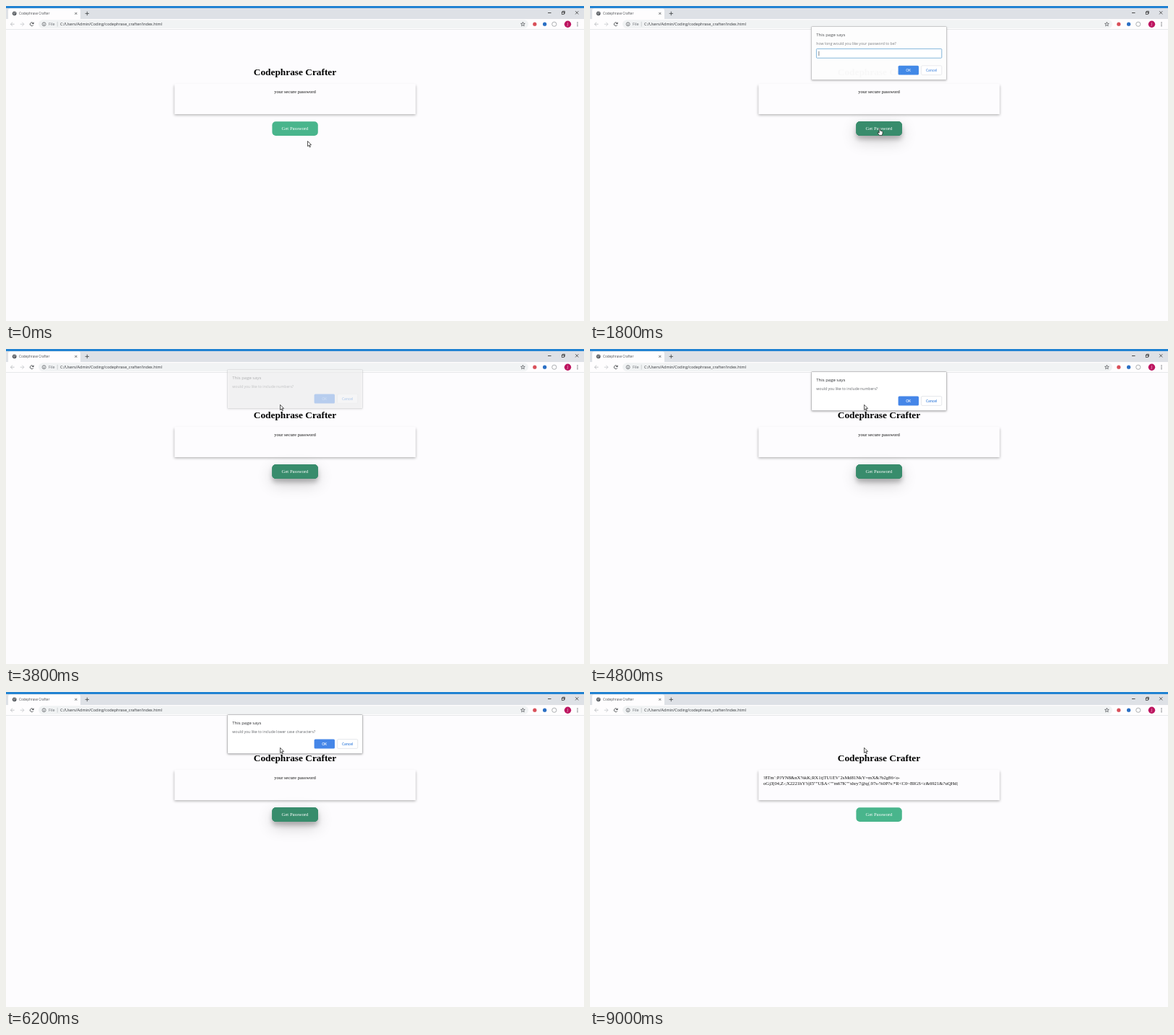
An HTML page with a canvas for the animation above (9.1 s loop, 800x437 px).

```html
<!DOCTYPE html>
<html lang="en">
<head>
<meta charset="utf-8">
<title>Codephrase Crafter</title>
<style>
html, body { margin: 0; width: 100%; height: 100%; overflow: hidden; background: #fdfcfe; }
canvas { display: block; width: 100vw; height: 100vh; }
</style>
</head>
<body>
<canvas id="stage" width="800" height="437"></canvas>
<script>
const ctx = document.getElementById('stage').getContext('2d');
const LOOP = 9100, STEP = 100;
const SANS = '"Open Sans", "Noto Sans", sans-serif';
const SERIF = '"Liberation Serif", "Noto Serif", serif';
const PAGE = '#fdfcfe', TITLE = 'Codephrase Crafter';

const PASSWORD = [
  '!8Tm`:PJYN8&nX%kK;RX1tjTU1EV`2sMd81NkY=mX&?b2g86<o-',
  'oGj3[04,Z-;X2221hY!t)I5""U$A<""m67K""xhry7@q(.97s-%0P?s:*R<C0~BIGS<c&6921&?uQHd|'
];

const DIALOGS = [
  { from: 1500, fade: 360, to: 3700, prompt: true, msg: 'how long would you like your password to be?' },
  { from: 3700, fade: 300, to: 5000, msg: 'would you like to include numbers?' },
  { from: 5000, fade: 300, to: 6000, msg: 'would you like to include upper case characters?' },
  { from: 6000, fade: 200, to: 7000, msg: 'would you like to include lower case characters?' },
  { from: 7000, fade: 200, to: 8100, msg: 'would you like to include special characters?' }
];

// time, x, y of the pointer tip
const POINTER = [
  [0, 417.5, 187.5], [200, 396.5, 200], [500, 396.5, 200], [900, 291, 198],
  [1300, 401, 170], [1800, 401, 170], [2300, 379.5, 77.3], [LOOP, 379.5, 77.3]
];

const clamp = v => Math.max(0, Math.min(1, v));
const mix = (a, b, k) => a + (b - a) * k;

function text(str, x, y, size, color, { align = 'left', family = SANS, weight = 400 } = {}) {
  ctx.font = `${weight} ${size}px ${family}`;
  ctx.textAlign = align;
  ctx.fillStyle = color;
  ctx.fillText(str, x, y);
}

function rect(x, y, w, h, color) {
  ctx.fillStyle = color;
  ctx.fillRect(x, y, w, h);
}

function box(x, y, w, h, r, fill, stroke, width = 0.8) {
  ctx.beginPath();
  ctx.roundRect(x, y, w, h, r);
  ctx.fillStyle = fill;
  ctx.fill();
  if (stroke) outline(stroke, width);
}

function outline(color, width) {
  ctx.strokeStyle = color;
  ctx.lineWidth = width;
  ctx.stroke();
}

function shadowBox(x, y, w, h, r, fill, dy, blur, alpha) {
  ctx.save();
  ctx.shadowColor = `rgba(0,0,0,${alpha})`;
  ctx.shadowBlur = blur;
  ctx.shadowOffsetY = dy;
  box(x, y, w, h, r, fill);
  ctx.restore();
}

function disc(x, y, r, color) {
  ctx.beginPath();
  ctx.arc(x, y, r, 0, 7);
  ctx.fillStyle = color;
  ctx.fill();
}

function ring(x, y, r, color, width = 0.7) {
  ctx.beginPath();
  ctx.arc(x, y, r, 0, 7);
  outline(color, width);
}

// Polyline from a flat list of coordinates
function line(pts, color, width = 0.8) {
  ctx.beginPath();
  for (let i = 0; i < pts.length; i += 2) ctx.lineTo(pts[i], pts[i + 1]);
  outline(color, width);
}

function cross(x, y, r, color) {
  line([x - r, y - r, x + r, y + r], color, 0.7);
  line([x - r, y + r, x + r, y - r], color, 0.7);
}

function tabStrip() {
  rect(0, 0, 800, 18, '#dee1e6');
  rect(0, 0, 800, 3, '#2283d2');
  box(3, 3.5, 100, 16, [3, 3, 0, 0], '#fefdfe');
  disc(11.7, 10.3, 2.9, '#55595e');
  line([9.8, 9.2, 11.4, 10.2, 11, 12], '#e8eaed', 0.7);
  line([12.2, 8.2, 13, 9.6, 13.8, 10.4], '#e8eaed', 0.7);
  text(TITLE, 18, 12.2, 4.65, '#4a4d51');
  cross(96.8, 10.4, 1.5, '#3c4043');
  line([109.6, 10.4, 115, 10.4], '#3c4043');
  line([112.3, 7.7, 112.3, 13.1], '#3c4043');
  line([750, 9.5, 754.5, 9.5], '#222');
  ctx.strokeStyle = '#222';
  ctx.lineWidth = 0.7;
  ctx.strokeRect(769.3, 8.3, 3, 3);
  line([770.3, 8.2, 770.3, 7.2, 773.4, 7.2, 773.4, 10.3, 772.5, 10.3], '#222', 0.7);
  cross(790.2, 9.3, 2.1, '#222');
}

function navArrow(x, dir, color) {
  line([x - 2.6 * dir, 25.2, x + 2.6 * dir, 25.2], color);
  line([x, 22.6, x + 2.6 * dir, 25.2, x, 27.8], color);
}

function toolbar() {
  rect(0, 18, 800, 14.5, '#fefdfe');
  rect(0, 32.3, 800, 0.7, '#dfe0e2');
  navArrow(9, -1, '#b5b7ba');
  navArrow(22.3, 1, '#c4c6c9');
  ctx.beginPath();
  ctx.arc(35.7, 25.2, 2.4, 0.5, 5.6);
  outline('#4a4d51', 0.9);
  ctx.beginPath();
  ctx.moveTo(38.5, 22.2);
  ctx.lineTo(38.5, 25);
  ctx.lineTo(35.7, 25);
  ctx.fillStyle = '#4a4d51';
  ctx.fill();

  box(45, 19.2, 678, 11.8, 5.9, '#f1f3f4');
  ring(52.6, 25.2, 2.5, '#55595e');
  line([52.6, 24.8, 52.6, 26.8], '#55595e');
  line([52.6, 23.4, 52.6, 24.1], '#55595e');
  text('File', 59, 27.2, 5.5, '#6b6f74');
  rect(70.8, 21.8, 0.6, 6.8, '#b4b7bb');
  text('C:/Users/Admin/Coding/codephrase_crafter/index.html', 75, 27.2, 5.5, '#303337');

  ctx.beginPath();
  for (let i = 0; i < 10; i++) {
    const a = -Math.PI / 2 + i * Math.PI / 5, r = i % 2 ? 1.3 : 3;
    ctx.lineTo(715.4 + r * Math.cos(a), 25.3 + r * Math.sin(a));
  }
  ctx.closePath();
  outline('#4a4d51', 0.7);

  disc(731.8, 25.2, 2.6, '#d9505a');
  disc(745.6, 25.2, 2.6, '#2a6fc4');
  ring(758.8, 25.2, 3.1, '#a3a6aa', 0.9);
  disc(777.5, 25.2, 4.7, '#bd1560');
  text('J', 777.5, 27, 5, '#fff', { align: 'center' });
  for (const y of [22.9, 25.2, 27.5]) disc(791, y, 0.65, '#4a4d51');
}

function page(t, hover) {
  const center = { align: 'center', family: SERIF };
  text(TITLE, 400, 95.5, 13.33, '#000', { ...center, weight: 700 });

  shadowBox(233.3, 108, 333.6, 42, 0, PAGE, 1.6, 3.6, 0.3);
  if (t < 8200) text('your secure password', 400, 121.4, 6.667, '#111', center);
  else PASSWORD.forEach((s, i) => text(s, 240, 121.4 + i * 7.7, 6.667, '#111', { family: SERIF }));

  const green = [[73, 181, 140], [56, 140, 108]];
  const fill = `rgb(${green[0].map((c, i) => Math.round(mix(c, green[1][i], hover)))})`;
  if (hover > 0) {
    shadowBox(368.4, 160.2, 63.4, 19.8, 5, fill, 7.1, 20.8, 0.19 * hover);
    shadowBox(368.4, 160.2, 63.4, 19.8, 5, fill, 5, 6.7, 0.24 * hover);
  }
  box(368.4, 160.2, 63.4, 19.8, 5, fill);
  text('Get Password', 400, 172.3, 6.667, '#fff', center);
}

function dialog(d, t) {
  const alpha = t < d.to ? clamp((t - d.from) / d.fade) : clamp(1 - (t - d.to + STEP) / 200);
  if (alpha <= 0) return;
  const h = d.prompt ? 74 : 54, by = d.prompt ? 85.8 : 65.6;
  ctx.save();
  ctx.globalAlpha = alpha;
  ctx.translate(0, -3 * Math.min(1, (1 - alpha) * 6));
  shadowBox(306.5, 31.5, 187, h, 1, '#fff', 1, 3, 0.35);
  box(306.5, 31.5, 187, h, 1, '#fff', '#b4b4b6', 0.8);
  text('This page says', 313.3, 45.1, 5.97, '#2b2d30');
  text(d.msg, 313.3, 56.8, 5.17, '#63666a');
  if (d.prompt) {
    box(313.4, 62.4, 173.4, 12.8, 1, '#fff', '#5c9fd0', 0.9);
    const typed = '128'.slice(0, clamp((t - 3000) / 300) * 3 + 0.01);
    text(typed, 316.5, 70.8, 5.17, '#222');
    const caretOn = t < 2300 || t >= 2800;
    if (caretOn) rect(316.6 + ctx.measureText(typed).width, 65.7, 0.6, 6.4, '#111');
  }
  const label = { align: 'center', weight: 600 };
  box(426.6, by, 28.4, 12.8, 1.5, d.prompt ? '#1d72e2' : '#4586e8');
  text('OK', 440.6, by + 8.1, 4.8, '#fff', label);
  box(458.6, by, 28.2, 12.8, 1.5, '#fff', '#dcdee2', 0.7);
  text('Cancel', 472.6, by + 8.1, 4.8, '#3a80dc', label);
  ctx.restore();
}

function pointerAt(t) {
  const i = POINTER.findIndex(p => p[0] > t);
  const [t0, x0, y0] = POINTER[i - 1], [t1, x1, y1] = POINTER[i];
  const k = (t - t0) / (t1 - t0);
  return [mix(x0, x1, k), mix(y0, y1, k)];
}

function shape(pts) {
  ctx.beginPath();
  for (let i = 0; i < pts.length; i += 2) ctx.lineTo(pts[i], pts[i + 1]);
  ctx.closePath();
  ctx.lineJoin = 'round';
  ctx.fillStyle = '#fff';
  ctx.fill();
  outline('#111', 0.7);
  ctx.lineJoin = 'miter';
}

function pointer(t) {
  const [x, y] = pointerAt(t);
  const onButton = t < 1900 && x > 368 && x < 432 && y > 160 && y < 180;
  ctx.save();
  ctx.translate(x, y);
  if (onButton) {
    shape([-0.8, 0.3, 0, -0.3, 0.8, 0.3, 0.8, 3, 3.6, 3.7, 4.2, 4.6, 4, 7.2, 3.2, 9.4,
      -0.6, 9.4, -2.8, 6.2, -2.6, 5.2, -1.6, 5.4, -0.8, 6.2]);
  } else {
    shape([0, 0, 0, 7.2, 1.7, 5.7, 2.8, 8.4, 3.9, 7.9, 2.8, 5.3, 5, 5.1]);
  }
  ctx.restore();
}

function draw(now) {
  const t = Math.floor(now % LOOP / STEP) * STEP;
  const hover = t < 8100 ? clamp((t - 1100) / 400) : clamp((8300 - t) / 300);
  rect(0, 0, 800, 437, PAGE);
  tabStrip();
  toolbar();
  page(t, hover);
  DIALOGS.forEach(d => dialog(d, t));
  pointer(t);
}

const start = performance.now();
function tick() {
  draw(performance.now() - start);
  requestAnimationFrame(tick);
}
tick();
</script>
</body>
</html>
```
